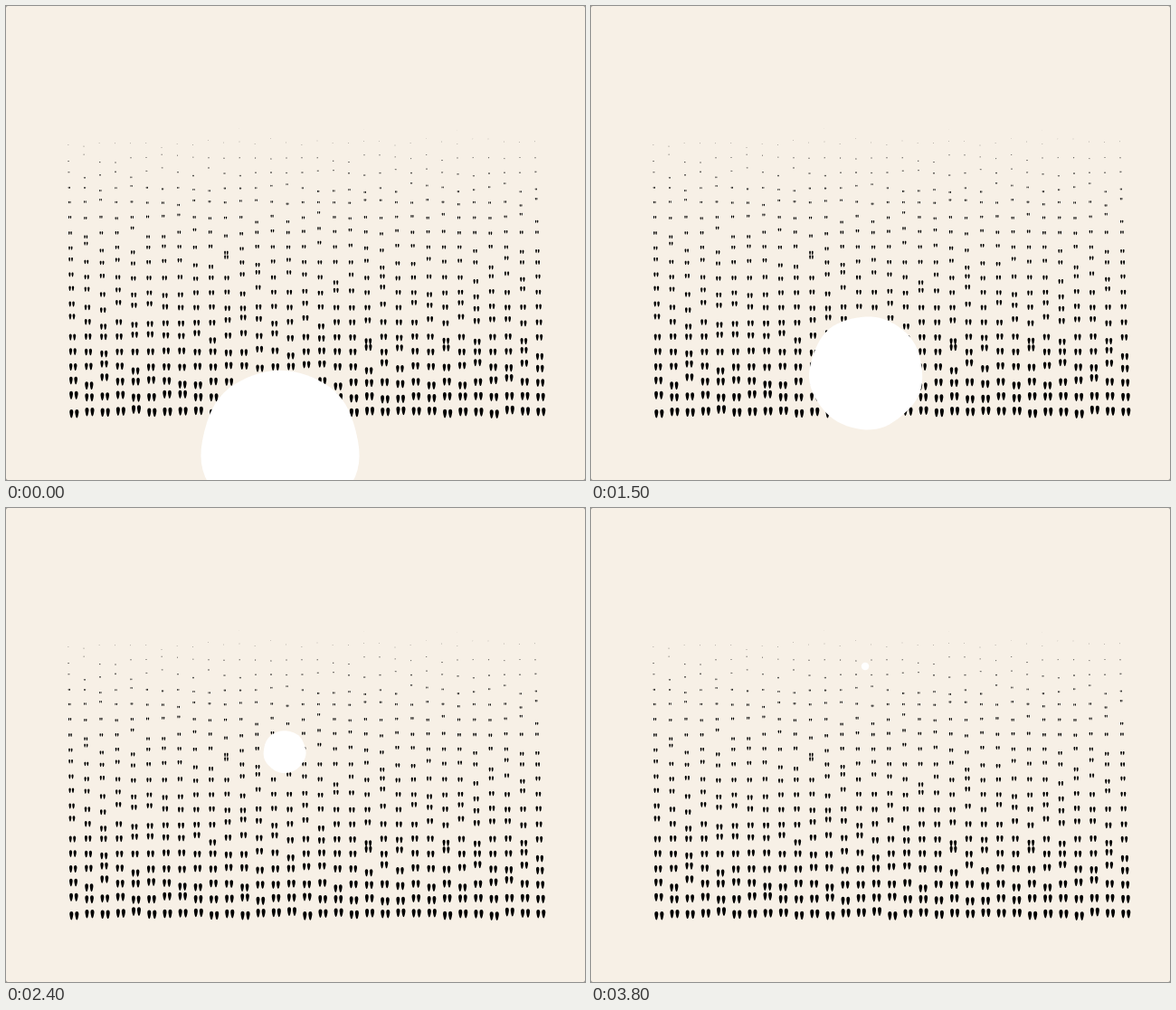
Recreate the animation shown at these times as an HTML page. Size 640 by 524 pixels, loop 3.9 s.

```html
<!DOCTYPE html>
<html lang="en">
<head>
<meta charset="utf-8">
<title>Rising sun over a field</title>
<style>
  html, body { margin: 0; width: 100%; height: 100%; overflow: hidden; background: #8b8783; }
  svg { display: block; width: 640px; height: 524px; background: #f7f0e6; border-radius: 2px; }
</style>
</head>
<body>
<svg viewBox="0 0 640 524">
  <path id="field" fill="#000"/>
  <path id="sun" fill="#fff"/>
</svg>
<script>
const COLS = 31, ROWS = 20, LEFT = 68.3, TOP = 135, COL_GAP = 17.2, ROW_GAP = 16.5;
const STEP = 100, STEPS = 39;

// Height of the sun's centre: step, y
const climb = [[0, 490], [5, 467], [9, 428], [14, 428], [18, 338.5], [24, 269.5], [32, 200], [38, 175]];

let seed = 29;
const random = () => (seed = seed * 16807 % 2147483647) / 2147483647;
const fix = n => n.toFixed(2);

// A drop with its round end up
function drop(x, y, w, h) {
  const p = (dx, dy) => fix(x + dx * w) + ' ' + fix(y + dy * h);
  return `M${p(0, -.5)}C${p(.42, -.5)} ${p(.55, -.32)} ${p(.5, -.12)}` +
    `C${p(.42, .1)} ${p(.25, .5)} ${p(0, .5)}` +
    `C${p(-.25, .5)} ${p(-.42, .1)} ${p(-.5, -.12)}C${p(-.55, -.32)} ${p(-.42, -.5)} ${p(0, -.5)}Z`;
}

// Pairs of drops that shrink with distance; the two front rows are more even
function fieldPath() {
  let d = '';
  for (let col = 0; col < COLS; col++) {
    for (let row = 0; row < ROWS; row++) {
      const u = random() * 2 - 1;
      const y = TOP + row * ROW_GAP + u + (row < ROWS - 2 ? 5 : 2) * u ** 3;
      const s = Math.max(0, (y - 130) / 319);
      const x = LEFT + col * COL_GAP + 7 * s;
      for (const side of [-1, 1]) d += drop(x + side * 3 * s, y, 4 * s, 9.6 * s);
    }
  }
  return d;
}

function sunY(step) {
  const i = Math.max(1, climb.findIndex(k => k[0] >= step));
  const [t0, y0] = climb[i - 1], [t1, y1] = climb[i];
  return y0 + (y1 - y0) * (step - t0) / (t1 - t0);
}

// Slightly uneven disc; its radius follows its height, levelling off far away
function sunPath(step) {
  if (step > 9 && step < 15) step = 9;
  const cx = 303 + 5 * Math.exp(-(((step - 24) / 7) ** 2));
  const cy = sunY(step);
  const half = .148 * (cy - 197);
  const radius = half + Math.hypot(half, 6.7);
  const pts = [];
  for (let i = 0; i < 72; i++) {
    const a = i * Math.PI / 36;
    const r = radius * (1 + .008 * Math.sin(5 * a + step * 2.1) + .007 * Math.sin(7 * a + step * 3.7));
    pts.push(fix(cx + r * Math.cos(a)) + ' ' + fix(cy + r * Math.sin(a)));
  }
  return 'M' + pts.join('L') + 'Z';
}

const sun = document.getElementById('sun');
document.getElementById('field').setAttribute('d', fieldPath());

const start = performance.now();
let shown = -1;
function draw() {
  const step = Math.floor((performance.now() - start) / STEP) % STEPS;
  if (step !== shown) sun.setAttribute('d', sunPath(shown = step));
  requestAnimationFrame(draw);
}
draw();
</script>
</body>
</html>
```
